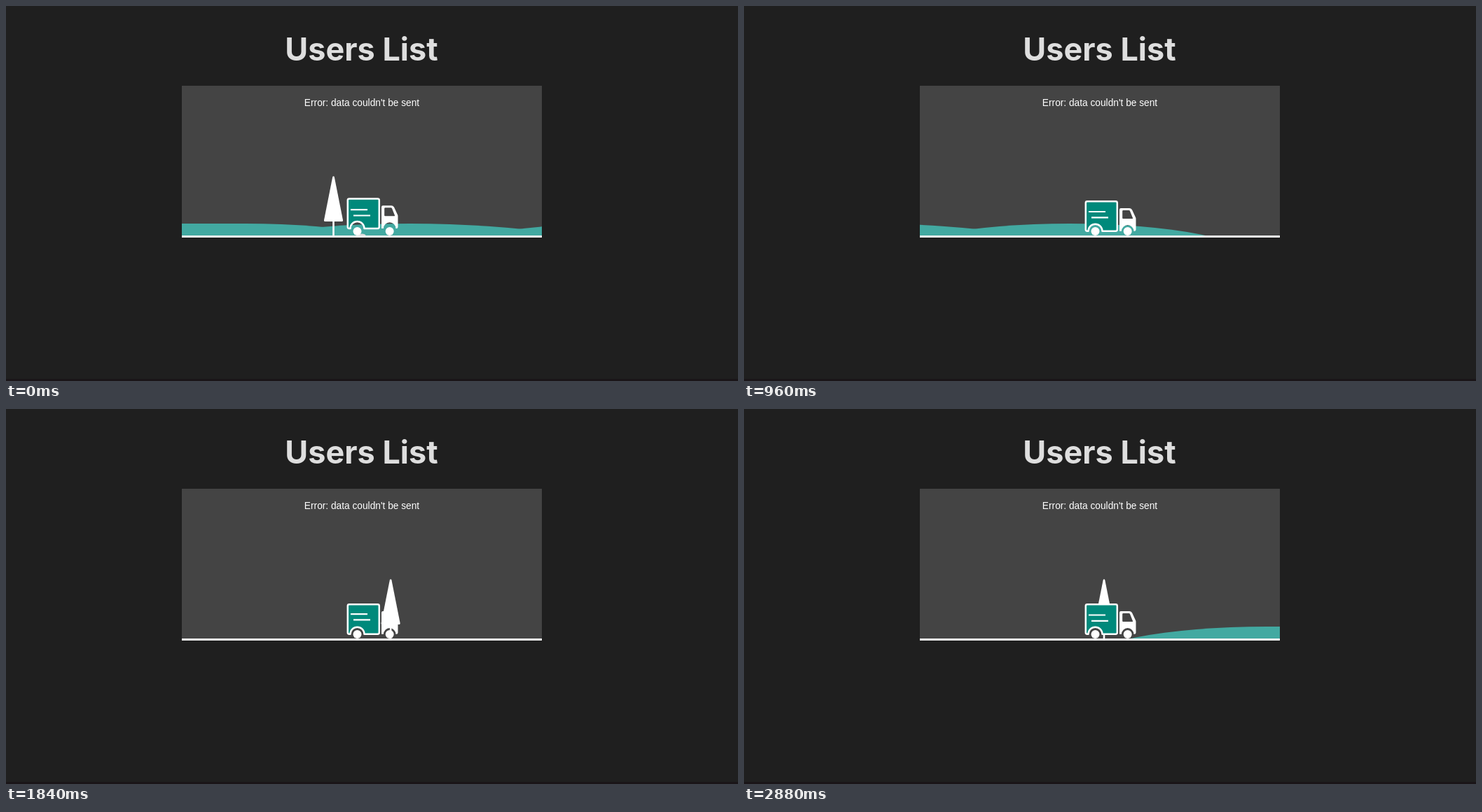
An HTML page that plays this animation: 1045x536 px, repeating every 2.96 s.

```html
<!DOCTYPE html>
<html lang="en">
<head>
<meta charset="utf-8">
<title>Users List</title>
<style>
  html, body { margin: 0; width: 100%; height: 100%; overflow: hidden; background: #1f1f1f; }
  svg { display: block; }
  text { text-anchor: middle; }
  .title { font: 700 45px Inter, sans-serif; fill: #dedede; }
  .message { font: 13.72px "Liberation Sans", Arial, sans-serif; fill: #fff; }
</style>
</head>
<body>
<svg width="1045" height="536" viewBox="0 0 1045 536">
  <defs>
    <g id="tree" fill="#fff">
      <path d="M-1.2 244 Q0 242.4 1.2 244 L13.5 306 Q13.7 308 12 308 H-12 Q-13.7 308 -13.5 306Z"/>
      <rect x="-1.3" y="307" width="2.6" height="22"/>
    </g>
  </defs>
  <rect y="533" width="1045" height="3" fill="#1a1518"/>
  <text class="title" x="507.5" y="77.5">Users List</text>
  <rect x="251" y="114" width="514" height="217" fill="#444"/>
  <text class="message" x="508" y="143">Error: data couldn't be sent</text>

  <svg x="251" y="114" width="514" height="217" viewBox="251 114 514 217">
    <g id="hills" fill="#42a9a1">
      <rect x="-762" y="311" width="634" height="104" rx="262" ry="52"/>
      <ellipse cx="-155" cy="359" rx="290" ry="48"/>
      <ellipse cx="138" cy="363" rx="262" ry="52"/>
    </g>
    <use id="tree1" href="#tree"/>
    <use id="tree2" href="#tree"/>
    <use id="tree3" href="#tree"/>
    <ellipse id="stone" cy="328" rx="5.5" ry="2.5" fill="#ddd"/>
    <rect x="251" y="328" width="514" height="3" fill="#f4f4f4"/>

    <g id="body">
      <path fill="#00897b" stroke="#fff" stroke-width="2.5" stroke-linejoin="round"
        d="M490 321.8 Q487.8 321.8 487.8 319.6 V281.4 Q487.8 279.2 490 279.2 H530.6 Q532.8 279.2 532.8 281.4
           V319.6 Q532.8 321.8 530.6 321.8 H511.5 A10 10 0 0 0 491.5 321.8Z"/>
      <path fill="#fff" fill-rule="evenodd"
        d="M538 289 H550 Q552.5 289 554 291.2 L558.5 301 Q559.5 302.5 559.5 304 V319.5 Q559.5 321.8 557.5 321.8
           H556.4 A8.7 8.7 0 0 0 539 321.8 H536 V291 Q536 289 538 289Z
           M541.5 292 Q540.2 292 540.2 293.2 V303 Q540.2 304 541.2 304 H554.4 Q555.5 304 555 303 L551.1 293.2 Q550.6 292 549.5 292Z"/>
      <path id="lines" stroke="#fff" stroke-width="2.2" d="M492 0 H516 M496 8.3 H520"/>
    </g>
    <g fill="#fff">
      <circle cx="501.5" cy="322" r="6"/>
      <circle cx="547.7" cy="322" r="6"/>
    </g>
  </svg>
</svg>
<script>
const LOOP = 2960, STEP = 80;

// Linear interpolation through [time, value] points, continued past both ends.
function track(...points) {
  return t => {
    let i = 1;
    while (i < points.length - 1 && t > points[i][0]) i++;
    const [t0, v0] = points[i - 1], [t1, v1] = points[i];
    return v0 + (v1 - v0) * (t - t0) / (t1 - t0);
  };
}

const scroll = {
  // The hills start over off stage at 1680 ms.
  hills: track([0, 732], [560, 497], [960, 327], [1600, 49], [1680, 1756], [2480, 1416], [2880, 1246]),
  tree1: track([0, 467.5], [560, 247.8]),
  tree2: track([1600, 646], [2160, 420], [2480, 293.5]),
  tree3: track([2480, 673.5], [2880, 514]),
  stone: track([0, 508], [560, 248.5])
};
const lineY = track([0, 295], [280, 293], [560, 292], [960, 294], [1280, 292], [1600, 293.5],
  [2160, 292.4], [2480, 294.4], [2680, 292.4], [2880, 294.5]);

const move = (id, x, y) =>
  document.getElementById(id).setAttribute("transform", `translate(${x} ${y})`);

function draw(now) {
  const t = Math.floor(now % LOOP / STEP) * STEP;
  for (const id in scroll) move(id, scroll[id](t), 0);
  move("body", 0, t < STEP ? -3.8 : 0);
  move("lines", 0, lineY(t));
  requestAnimationFrame(draw);
}
draw(0);
</script>
</body>
</html>
```
